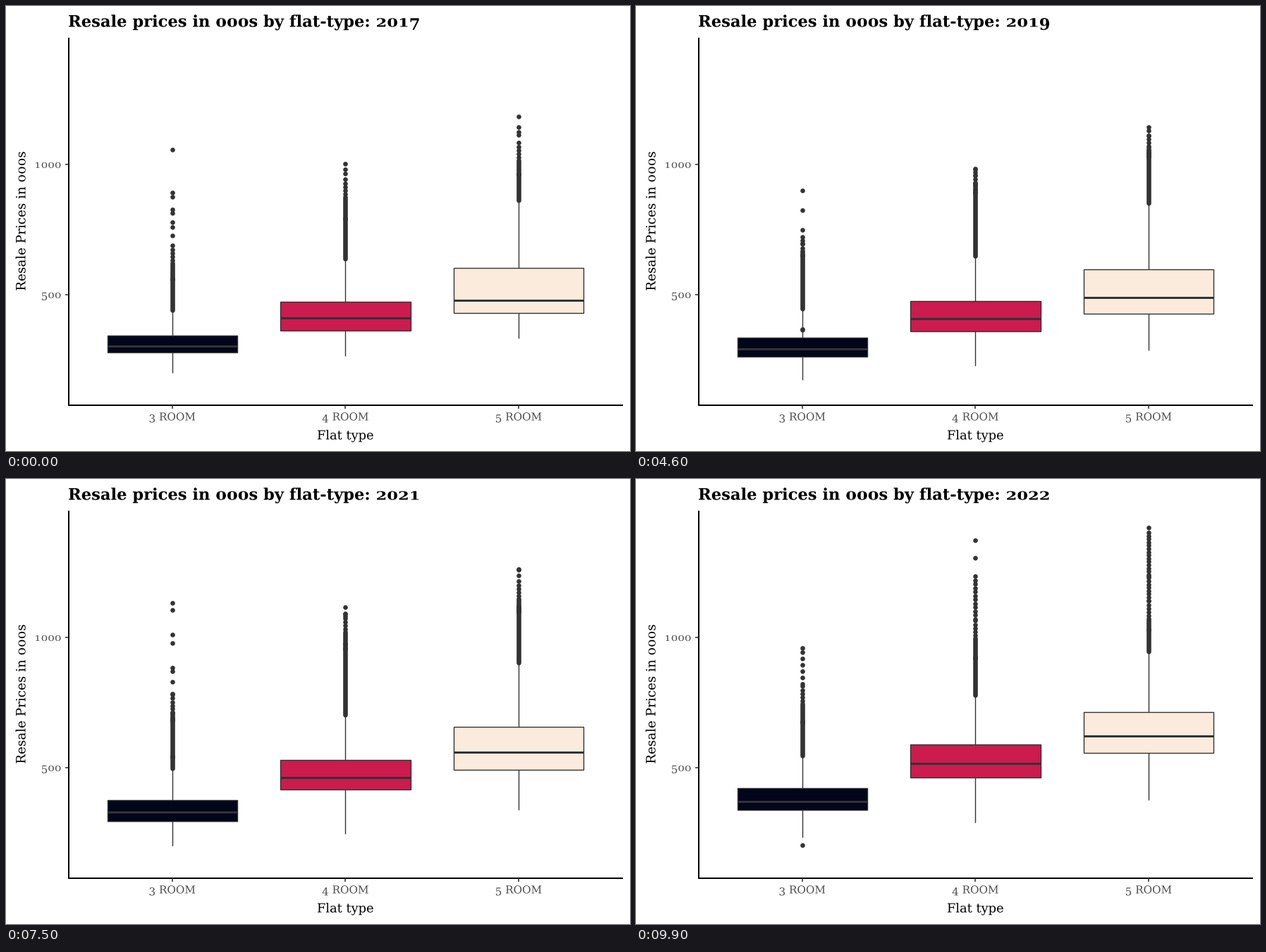
A matplotlib script for the animation above (10 s loop, 885x632 px).

```python
from itertools import groupby

import matplotlib.pyplot as plt
import numpy as np
from matplotlib.animation import FuncAnimation
from matplotlib.patches import PathPatch, Rectangle
from matplotlib.path import Path
from matplotlib.text import Text
from matplotlib.textpath import TextPath, TextToPath
from matplotlib.transforms import Affine2D

W, H, DPI, FRAMES = 885, 632, 100, 100
PT = 72 / DPI
INK, GRAY = "#333333", "#4D4D4D"
YEARS = np.round(np.linspace(0, FRAMES - 1, 6))   # frame at which each year is reached
TOP_KEYS = [0, 40, 62, 84, 99]                    # knots for the dense column's top
DOT = 6.6
FRINGE = 4.2 * np.arange(1, 6) ** 1.1             # loose dots above the column

fig = plt.figure(figsize=(W / DPI, H / DPI), dpi=DPI, facecolor="white")
ax = fig.add_axes([0, 0, 1, 1])
ax.set_xlim(0, W)
ax.set_ylim(H, 0)
ax.axis("off")


def figure_kind(c):
    return "low" if c in "012" else "drop" if c in "34579" else "plain"


def label(x, y, text, size, color="black", weight="normal", align=0.0, angle=0):
    """Text with old-style figures; align is the share of the width left of x."""
    prop = Text(family="DejaVu Serif", weight=weight, size=size).get_fontproperties()
    parts, pen = [], 0.0
    for kind, run in groupby(text, figure_kind):
        run = "".join(run)
        path = TextPath((0, 0), run, size=size, prop=prop)
        tall = 0.73 if kind == "low" else 1
        shift = -0.19 * size if kind == "drop" else 0
        parts.append(path.transformed(Affine2D().scale(1, tall).translate(pen, shift)))
        pen += TextToPath().get_text_width_height_descent(run, prop, False)[0]
    place = (Affine2D().translate(-align * pen, 0).rotate_deg(angle)
             .scale(1, -1).translate(x, y))
    path = Path.make_compound_path(*parts).transformed(place)
    return ax.add_patch(PathPatch(path, fc=color, lw=0, zorder=5))


def line(xs, ys, width, color=INK, z=2, cap="butt"):
    return ax.plot(xs, ys, color=color, lw=width * PT, zorder=z,
                   solid_capstyle=cap)[0]


class Box:
    """Box plot whose outliers leave the dense column, peak in one year and return."""
    HALF = 92.2

    def __init__(self, x, color, stats, tops, peaks, extra=()):
        self.x, self.tops = x, tops
        # the second value holds for two years
        self.stats = [[a, b, b, *rest] for a, b, *rest in stats]
        self.tracks = list(extra)
        for k, heights in enumerate(peaks):
            self.tracks += [self.track(k, y) for y in heights]
        self.column = line([], [], DOT, z=1, cap="round")
        self.dots = ax.plot([], [], "o", color=INK, ms=DOT * PT, mew=0, zorder=1)[0]
        self.lower = line([], [], 1.4)
        self.upper = line([], [], 1.4)
        self.rect = ax.add_patch(Rectangle((x - self.HALF, 0), 2 * self.HALF, 0, fc=color,
                                           ec=INK, lw=1.4 * PT, zorder=3))
        self.median = line([], [], 3, z=4)

    def summary(self, i):
        low, q1, mid, q3 = (np.interp(i, YEARS, s) for s in self.stats)
        return low, q1, mid, q3, q3 - 1.5 * (q1 - q3), np.interp(i, TOP_KEYS, self.tops)

    def inside(self, k, share=0.35):
        *_, fence, top = self.summary(YEARS[k])
        return top + (fence - top) * share

    def track(self, k, y):
        first, vals = k, [y]
        if k > 0:
            below = y > self.summary(YEARS[k])[1]
            first, vals = k - 1, [self.inside(k - 1, 0.85 if below else 0.35), y]
        if k + 1 < len(YEARS):
            vals.append(self.inside(k + 1))
        return (first, *vals)

    def update(self, i):
        low, q1, mid, q3, fence, top = self.summary(i)
        ys = list(top - FRINGE)
        for k, *vals in self.tracks:
            keys = YEARS[k:k + len(vals)]
            if keys[0] <= i <= keys[-1]:
                ys.append(np.interp(i, keys, vals))
        x = self.x
        self.dots.set_data([x] * len(ys), ys)
        self.column.set_data([x, x], [top, fence])
        self.lower.set_data([x, x], [q1, low])
        self.upper.set_data([x, x], [q3, fence])
        self.rect.set_y(q3)
        self.rect.set_height(q1 - q3)
        self.median.set_data([x - self.HALF, x + self.HALF], [mid, mid])


# stats rows: lower whisker end, lower quartile, median, upper quartile
three = Box(
    235.7, "#03051A",
    [[521, 531, 529.6, 519, 509],
     [492, 499, 497, 483.4, 469.5],
     [483, 488, 485.2, 470.5, 458],
     [468, 472.5, 468.3, 453, 439]],
    [365, 361, 330, 331, 319],
    [[204, 265, 271, 289, 294, 307, 314, 326],
     [170, 218, 294],
     [214, 255, 296],
     [230, 270, 278, 286, 538, 543],
     [128, 141, 185, 200, 243, 250, 268, 290],
     [239.5, *np.arange(246, 295, 9), 520]])

four = Box(
    481.3, "#CB1B4F",
    [[497, 510, 513, 501.7, 487.5],
     [461, 464.5, 457, 437, 423.5],
     [443, 447, 438.8, 420.3, 404],
     [420, 421.5, 414.5, 394.5, 377]],
    [271, 265, 230, 208, 226],
    [[224, 232, 238],
     [167, 194, 209],
     [212, 223],
     [154, 160, 184, 194],
     [159, 170, 175],
     [87, 112, *np.arange(138, 200, 5.5)]])

five = Box(
    726.9, "#FAEBDD",
    [[472, 489, 490.3, 465, 455.5],
     [436, 439, 431.3, 409, 388.5],
     [418, 417.5, 405.8, 383.5, 365],
     [372, 374.3, 372.8, 347.4, 331]],
    [219, 214, 193, 154, 198],
    [[157, 172, 179, 183],
     [147, 158],
     [146, 154, 164],
     [125, *np.arange(137, 165, 5.5)],
     [104, 114],
     [69, *np.arange(76, 176, 4.6)]],
    extra=[(3, 280, 90, 138)])
boxes = [three, four, five]

line([88.5, 88.5], [45, 567.3], 2, "black")
line([87.6, 874.5], [566.5, 566.5], 2, "black")
for y, text in [(224.5, "1000"), (409.5, "500")]:
    line([83.5, 88], [y, y], 1.6)
    label(78.5, y + 5.5, text, 15.1, GRAY, align=1)
for n, box in enumerate(boxes, 3):
    line([box.x, box.x], [567, 571.5], 1.6)
    label(box.x, 588.5, f"{n} ROOM", 15.2, GRAY, align=0.5)
label(481.3, 615.5, "Flat type", 17.8, align=0.5)
label(27.5, 305.5, "Resale Prices in 000s", 18.3, align=0.5, angle=90)

titles = [label(88, 29.5, f"Resale prices in 000s by flat-type: {year}", 22.6, weight="bold")
          for year in range(2017, 2023)]


def draw(i):
    now = int(5 * i / (FRAMES - 1) + 0.5)
    for n, title in enumerate(titles):
        title.set_visible(n == now)
    for box in boxes:
        box.update(i)
    return []


anim = FuncAnimation(fig, draw, frames=FRAMES, interval=100, repeat=True, repeat_delay=0)
plt.show()
```
